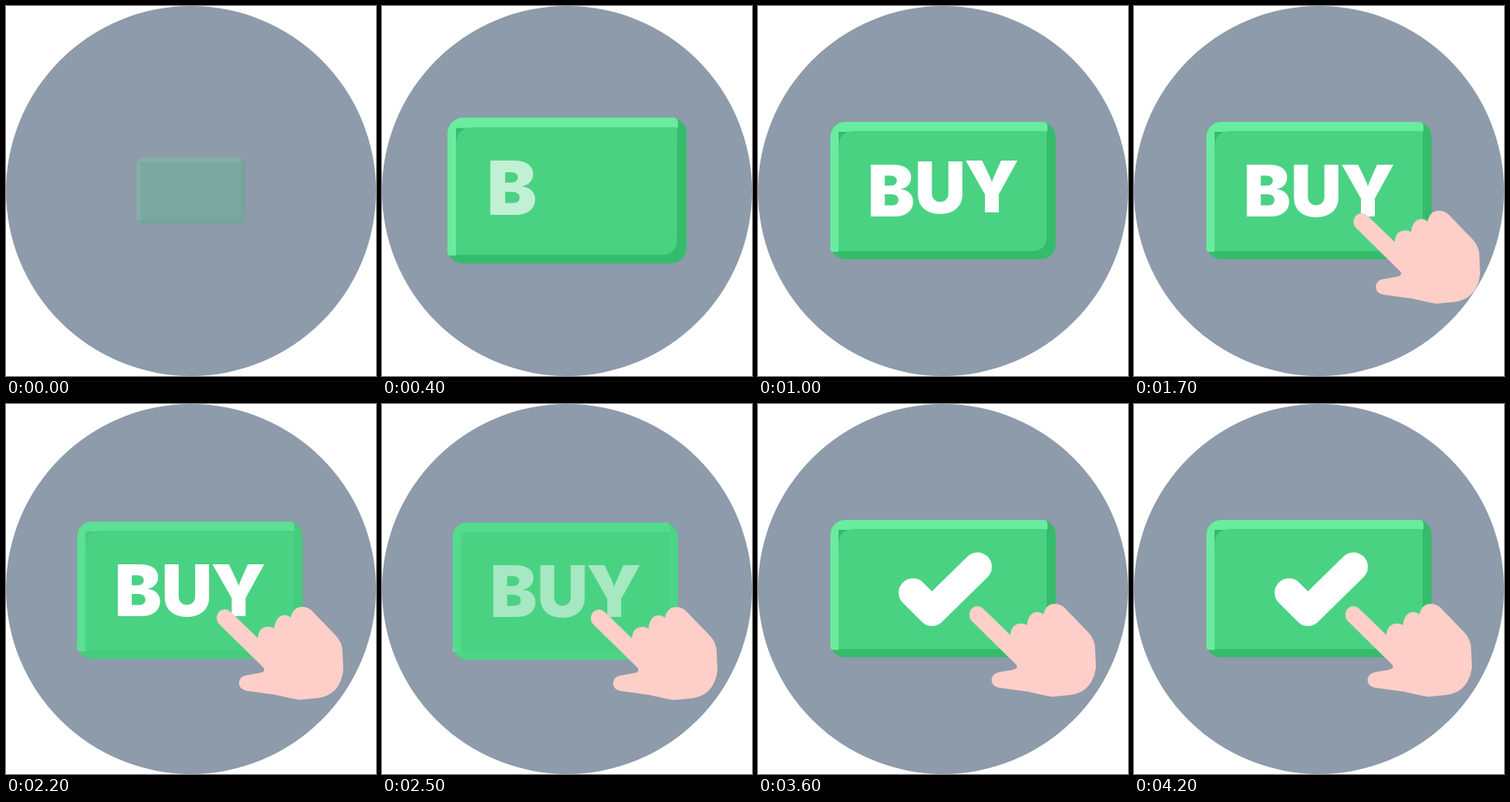
Write an HTML page that moves like this. It is 450 px wide and 450 px high and loops after 5 s.

```html
<!DOCTYPE html>
<html lang="en">
<head>
<meta charset="utf-8">
<title>Buy button</title>
<style>
  html, body { margin: 0; width: 100%; height: 100%; overflow: hidden; background: #fff; }
  svg { display: block; width: 450px; height: 450px; }
  text { font: 900 86px Inter, sans-serif; text-anchor: middle; fill: #fff; }
</style>
</head>
<body>
<svg viewBox="0 0 450 450">
  <circle cx="225" cy="225" r="225" fill="#8d9baa"/>
  <g id="button">
    <rect x="88" y="141" width="274" height="167" rx="18" fill="#35bc6b"/>
    <path d="M98 299H91Q88 299 88 295V159A18 18 0 0 1 106 141H347Q351 141 352 145V153H98Z" fill="#6aec9f"/>
    <rect id="flat" x="88" y="141" width="274" height="167" rx="18" fill="#52d98b"/>
    <path d="M98 298V172Q98 152 118 152H351V280Q351 298 333 298Z" fill="#4ad283"/>
    <g id="label">
      <text x="162" y="255.5">B</text>
      <text x="221.5" y="255.5">U</text>
      <text x="284" y="255.5">Y</text>
    </g>
    <path id="check" d="M188.500 229.500L211.500 252.500L267 198" fill="none" stroke="#fff"
      stroke-width="35" stroke-linecap="round" stroke-linejoin="round"/>
  </g>
  <path id="hand" fill="#fdcfc8" d="M274 249L307 281Q308 267 320 267Q324 267 327 269Q329 253 340 253
    Q344 253 347 256Q350 243 361 243Q368 243 373 248L402 278Q410 287 410 297L411 320Q409 336 400 345
    Q391 353 379 354L358 356Q350 355 329 350L293 345Q284 343 284 335Q285 327 294 326L311 323
    Q317 321 314 317L260 264C254 257 258 246 267 246Q271 246 274 249Z"/>
</svg>
<script>
const LOOP = 5000, STEP = 100, LAST = 4200;
const [button, flat, label, check, hand] =
  ['button', 'flat', 'label', 'check', 'hand'].map(id => document.getElementById(id));
const letters = [...label.children];
const checkLength = check.getTotalLength();
const clamp = v => Math.max(0, Math.min(1, v));
const ramp = (t, from, to) => clamp((t - from) / (to - from));

// Piecewise linear value through [time, value] points.
function track(t, points) {
  let value = points[0][1];
  for (let i = 1; i < points.length; i++) {
    const [t0, v0] = points[i - 1], [t1, v1] = points[i];
    if (t >= t0) value = v0 + (v1 - v0) * ramp(t, t0, t1);
  }
  return value;
}

function draw(t) {
  const scale = track(t, [[0, .482], [200, .82], [300, .97], [400, 1.062], [500, 1.085],
    [600, 1.07], [700, 1.04], [800, 1.012], [900, 1]]);
  const press = ramp(t, 2000, 2300) - ramp(t, 2500, 2800);
  button.setAttribute('transform', `translate(${225 - 2 * press} ${224.5 + 3 * press})
    scale(${scale}) translate(-225 -224.5)`);
  button.setAttribute('opacity', clamp(.25 + t / 400));
  flat.setAttribute('opacity', .85 * press);

  letters.forEach((letter, i) => {
    const age = t - 200 - 200 * i;
    letter.setAttribute('opacity', ramp(age, 0, 300));
    letter.setAttribute('transform', `translate(0 ${-5 * Math.sin(Math.PI * ramp(age, 0, 800))})`);
  });
  label.setAttribute('opacity', 1 - ramp(t, 2300, 2700));

  const drawn = checkLength * ramp(t, 2800, 3450);
  check.setAttribute('stroke-dasharray', `${drawn} 999`);
  check.setAttribute('visibility', drawn ? 'visible' : 'hidden');

  const x = track(t, [[1100, 30], [1400, 16], [1700, 10], [1900, 6], [2300, -3], [2500, -3], [2800, 0]]);
  const y = track(t, [[1100, 46], [1400, 18], [1700, 6], [1900, 3], [2300, 4], [2500, 4], [2800, 0]]);
  hand.setAttribute('transform', `translate(${x} ${y})`);
  hand.setAttribute('opacity', ramp(t, 1100, 1500));
}

function tick() {
  const t = performance.now() % LOOP;
  draw(Math.min(LAST, Math.floor(t / STEP) * STEP));
  requestAnimationFrame(tick);
}
tick();
</script>
</body>
</html>
```
